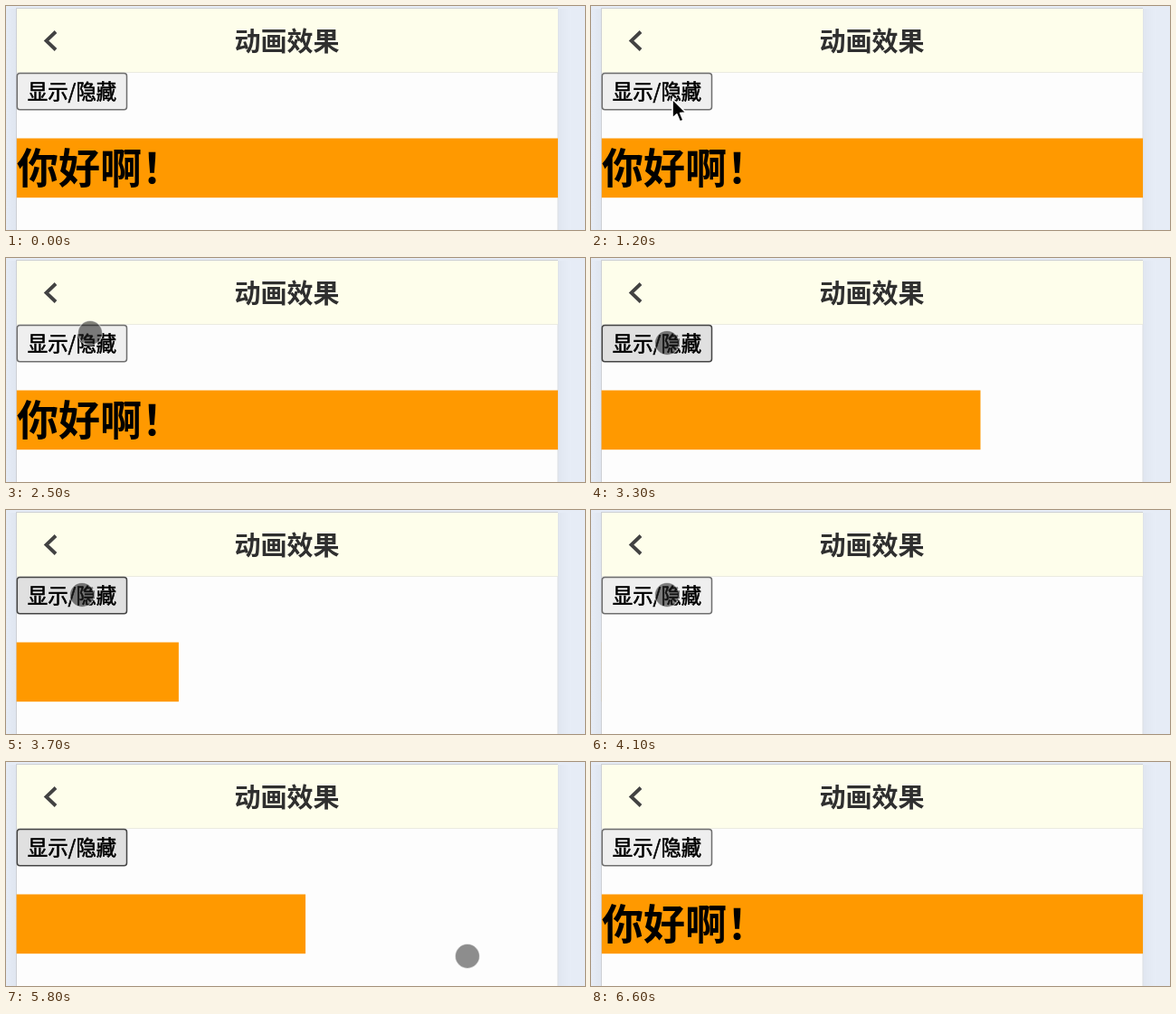
Animation, 640 px wide and 248 px high, one loop 6800 ms. Source, as an HTML page:

```html
<!DOCTYPE html>
<html lang="zh-CN">
<head>
<meta charset="utf-8">
<title>动画效果</title>
<style>
  html, body { margin: 0; width: 100%; height: 100%; overflow: hidden; background: #e6ecf6; }
  svg { display: block; width: 640px; height: 248px; }
  text { font-family: "Noto Sans CJK SC", "Noto Sans CJK", "Noto Sans CJK JP", sans-serif; }
</style>
</head>
<body>
<svg viewBox="0 0 640 248">
  <defs>
    <linearGradient id="left">
      <stop offset="0" stop-color="#e6ecf6"/>
      <stop offset="1" stop-color="#dfe5ef"/>
    </linearGradient>
    <linearGradient id="right">
      <stop offset="0" stop-color="#e0e6f0"/>
      <stop offset="1" stop-color="#e7edf7"/>
    </linearGradient>
    <clipPath id="screen"><rect x="11.6" y="3" width="598.6" height="245"/></clipPath>
  </defs>

  <rect width="640" height="248" fill="#e6ecf6"/>
  <rect y="3" width="12" height="245" fill="url(#left)"/>
  <rect x="610" y="3" width="14" height="245" fill="url(#right)"/>
  <rect x="11" y="2" width="599" height="246" fill="#cdd0d5"/>
  <rect x="12" y="3" width="598" height="245" fill="#fdfdfd"/>
  <rect x="609.5" y="3" width="1" height="245" fill="#dcdfe4"/>

  <rect x="12" y="3" width="598" height="70" fill="#fefeeb"/>
  <rect x="12" y="73" width="598" height="1" fill="#ebebe0"/>
  <path d="M55 28.5 44.5 38.5l10.5 10" fill="none" stroke="#424242" stroke-width="3.8"/>
  <text x="310.5" y="49.6" font-size="29" font-weight="700" fill="#2f2f2f" text-anchor="middle">动画效果</text>

  <rect id="button" x="12.3" y="74.5" width="121.2" height="40.2" rx="3" stroke-width="1.5"/>
  <text x="73" y="102.8" font-size="22.4" text-anchor="middle" stroke="#000" stroke-width=".6">显示/隐藏</text>

  <g clip-path="url(#screen)">
    <g id="banner">
      <rect x="11.6" y="146.5" width="598.6" height="65.7" fill="#ff9900"/>
      <text x="12" y="196.4" font-size="46" font-weight="700">你好啊！</text>
    </g>
  </g>

  <path id="arrow" d="M0 0V21L4.8 16.8 8.3 25 12 23.4 8.6 15.5 15 15Z"
        fill="#000" stroke="#fff" stroke-width="1.6" stroke-linejoin="round"/>
  <circle id="touch" r="13.5" stroke="#fff" stroke-opacity=".5" stroke-width="1.2"/>
</svg>
<script>
  const LOOP = 6800, STEP = 100, WIDTH = 598, SLIDE = 1000;
  const HIDE_AT = 3000, SHOW_AT = 5266;
  const [button, banner, arrow, touch] =
    ["button", "banner", "arrow", "touch"].map(id => document.getElementById(id));

  // Pointer stops: time, x, y
  const arrowPath = [[0, 280, 275], [100, 270, 262], [400, 160, 185], [700, 100, 128],
    [1000, 90, 103], [1400, 90, 103], [1800, 95, -30]];
  const touchPath = [[1900, 95, -18], [2100, 94, 25], [2500, 93, 83], [2900, 84, 94],
    [5200, 84, 94], [5400, 190, 124], [5800, 510, 215], [5900, 530, 228], [6200, 560, 268]];

  const clamp = v => Math.min(1, Math.max(0, v));

  function pointAt(path, t) {
    let i = 1;
    while (i < path.length - 1 && path[i][0] < t) i++;
    const [t0, x0, y0] = path[i - 1], [t1, x1, y1] = path[i];
    const k = clamp((t - t0) / (t1 - t0));
    return [x0 + (x1 - x0) * k, y0 + (y1 - y0) * k];
  }

  const move = (el, x, y = 0) => el.setAttribute("transform", `translate(${x} ${y})`);

  function draw(t) {
    const hidden = clamp((t - HIDE_AT) / SLIDE) - clamp((t - SHOW_AT) / SLIDE);
    move(banner, -(WIDTH + 1) * hidden);

    const active = (t >= HIDE_AT && t < 4100) || (t >= 5200 && t < 6400);
    button.setAttribute("fill", active ? "#e0e0e0" : "#efefef");
    button.setAttribute("stroke", active ? "#444" : "#6e6e6e");

    move(arrow, ...pointAt(arrowPath, t));
    const [x, y] = pointAt(touchPath, t);
    move(touch, x, y);
    touch.setAttribute("fill", `rgba(30,30,30,${x < 140 ? 0.56 : 0.5})`);
  }

  const start = performance.now();
  function tick() {
    const t = (performance.now() - start) % LOOP;
    draw(Math.floor(t / STEP) * STEP);
    requestAnimationFrame(tick);
  }
  draw(0);
  requestAnimationFrame(tick);
</script>
</body>
</html>
```
